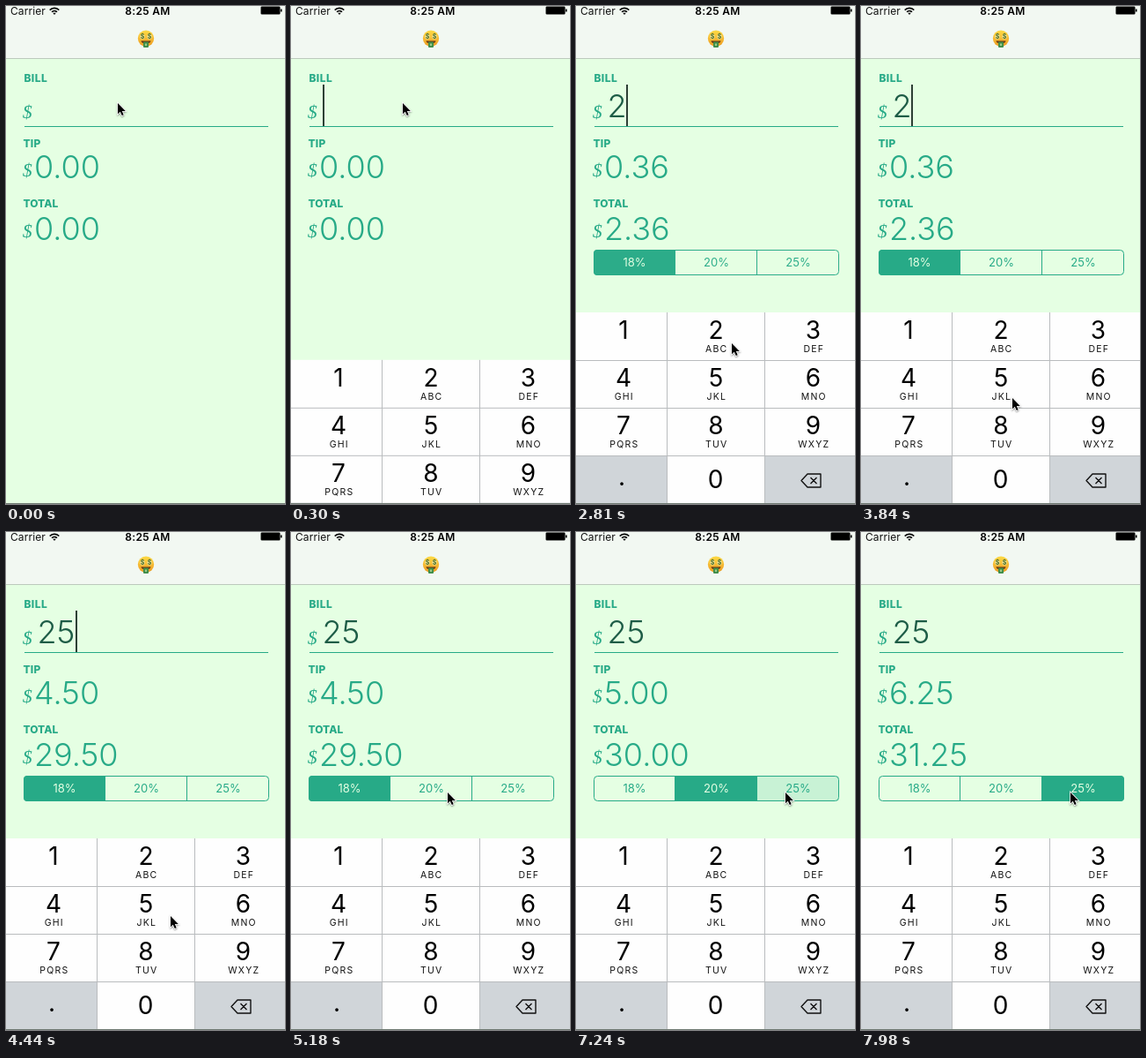
An HTML page with a canvas that plays this animation: 317x564 px, repeating every 8 s.

```html
<!DOCTYPE html>
<html lang="en">
<head>
<meta charset="utf-8">
<title>Tip calculator</title>
<style>
html, body { margin: 0; width: 100%; height: 100%; overflow: hidden; background: #e5ffe3; }
canvas { display: block; width: 317px; height: 564px; }
</style>
</head>
<body>
<canvas id="stage"></canvas>
<script>
const W = 317, H = 564, LOOP = 8000;
const TEAL = '#27aa87', MINT = '#e5ffe3', INK = '#1d5c46';
const SANS = 'Inter, Roboto, sans-serif';
const canvas = document.getElementById('stage');
const ctx = canvas.getContext('2d');
const ratio = window.devicePixelRatio || 1;
canvas.width = W * ratio;
canvas.height = H * ratio;

const clamp = v => Math.max(0, Math.min(1, v));
const ramp = (t, a, b) => clamp((t - a) / (b - a));
const smooth = p => p * p * (3 - 2 * p);

// Pointer stops: time, x, y
const POINTER = [
  [300, 126, 108], [590, 125, 246], [1490, 125, 246], [2070, 176, 380],
  [3200, 176, 380], [3400, 175, 414], [3780, 171, 442], [4140, 171, 442],
  [4290, 231, 462], [4440, 186, 433], [4640, 186, 433], [5130, 177, 293],
  [5820, 177, 293], [6300, 217, 293], [6500, 217, 293], [6940, 237, 293]
];

// Bill states: time, bill, tip, total, selected segment
const STATES = [
  [0, '', '0.00', '0.00', 0],
  [2500, '2', '0.36', '2.36', 0],
  [4120, '25', '4.50', '29.50', 0],
  [5450, '25', '5.00', '30.00', 1],
  [7350, '25', '6.25', '31.25', 2]
];

// Caret cycles: start, first fade out
const CARET = [[200, 870], [2500, 3050], [4120, 4660]];
const BLINK = 1030;

const KEYS = ['', 'ABC', 'DEF', 'GHI', 'JKL', 'MNO', 'PQRS', 'TUV', 'WXYZ'];
const COLS = [0, 104, 215, 317], MIDS = [54, 159, 269.5];

function rect(x, y, w, h, color) {
  ctx.fillStyle = color;
  ctx.fillRect(x, y, w, h);
}

function text(str, x, y, font, color, align = 'left', spacing = 0) {
  ctx.font = font;
  ctx.fillStyle = color;
  ctx.textAlign = align;
  ctx.letterSpacing = spacing + 'px';
  ctx.fillText(str, x, y);
}

function poly(points, fill) {
  ctx.beginPath();
  points.forEach(([x, y]) => ctx.lineTo(x, y));
  ctx.closePath();
  if (fill) { ctx.fillStyle = fill; ctx.fill(); }
}

function oval(x, y, rx, ry, fill) {
  ctx.beginPath();
  ctx.ellipse(x, y, rx, ry, 0, 0, Math.PI * 2);
  ctx.fillStyle = fill;
  ctx.fill();
}

function outline(x, y, w, h, r, color) {
  ctx.beginPath();
  ctx.roundRect(x, y, w, h, r);
  ctx.strokeStyle = color;
  ctx.lineWidth = 1;
  ctx.stroke();
}

function latest(list, t) {
  return list.reduce((found, item) => item[0] <= t ? item : found, list[0]);
}

function pointerAt(t) {
  const i = POINTER.findIndex(p => p[0] > t);
  if (i === 0) return POINTER[0].slice(1);
  if (i < 0) return POINTER[POINTER.length - 1].slice(1);
  const [a, x, y] = POINTER[i - 1], [b, u, v] = POINTER[i];
  const p = smooth(ramp(t, a, b));
  return [x + (u - x) * p, y + (v - y) * p];
}

function caretAlpha(t) {
  if (t < CARET[0][0]) return 0;
  const dt = t - latest(CARET, t)[1];
  if (dt < 0) return 1;
  const c = dt % BLINK;
  return c < 400 ? 1 - ramp(c, 0, 150) : ramp(c, 560, 670);
}

function drawFace(x, y) {
  const skin = ctx.createLinearGradient(0, y - 9, 0, y + 9);
  skin.addColorStop(0, '#fcd944');
  skin.addColorStop(1, '#ee9b22');
  oval(x, y - 0.3, 9.2, 9.2, skin);
  for (const side of [-4, 4]) {
    oval(x + side, y - 2.3, 2.6, 2.9, '#f3e9a0');
    text('$', x + side, y + 0.2, 'bold 7px ' + SANS, '#4a6b25', 'center');
  }
  ctx.beginPath();
  ctx.ellipse(x, y + 2.6, 5.5, 3.2, 0, 0, Math.PI);
  ctx.fillStyle = '#6b3a16';
  ctx.fill();
  ctx.beginPath();
  ctx.roundRect(x - 3, y + 3.5, 6, 6.5, 1);
  ctx.fillStyle = '#3f8d48';
  ctx.fill();
  oval(x, y + 6.8, 1.2, 1.5, '#9cc98c');
}

function drawHeader() {
  rect(0, 0, W, 59, '#f2f8f2');
  rect(0, 59, W, 1, '#bccabc');
  text('Carrier', 5, 10, '12px ' + SANS, '#111', 'left', 0.1);
  text('8:25 AM', 161, 10, '600 12px ' + SANS, '#000', 'center', 0.3);
  ctx.strokeStyle = '#000';
  ctx.lineWidth = 1.7;
  for (const r of [4, 7.2]) {
    ctx.beginPath();
    ctx.arc(55, 9.5, r, -Math.PI * 0.76, -Math.PI * 0.24);
    ctx.stroke();
  }
  poly([[55, 10], [53.2, 7.8], [56.8, 7.8]], '#000');
  outline(289.5, 0.5, 22, 9, 1.5, 'rgba(0,0,0,.5)');
  rect(290, 1, 21, 8, '#000');
  rect(312, 3.5, 1.5, 3, '#000');
  drawFace(159, 37);
}

function drawBill(t, [, bill, tip, total]) {
  const label = '800 12px ' + SANS, sign = 'italic 22px "Liberation Serif", serif';
  const money = '300 36px ' + SANS;
  text('BILL', 20.5, 86, label, TEAL, 'left', 0.4);
  text('TIP', 19.5, 160, label, TEAL, 'left', 0.2);
  text('TOTAL', 19.5, 228, label, TEAL);
  for (const y of [127, 193, 262]) text('$', 18.7, y, sign, TEAL);
  text(bill, 35.5, 126, money, INK);
  text(tip, 32, 195, money, TEAL);
  text(total, 32, 265, money, TEAL);
  rect(21, 136, 277, 1, TEAL);
  ctx.globalAlpha = caretAlpha(t);
  rect([36, 57, 79][bill.length], 89, 2, 47, '#2d3f35');
  ctx.globalAlpha = 1;
}

function drawSegments(t, selected) {
  const edges = [20, 112, 205, 299];
  const pressed = t > 5300 && t < 5450 ? 1 : t > 7200 && t < 7350 ? 2 : -1;
  ctx.globalAlpha = smooth(ramp(t, 2480, 2850));
  ctx.save();
  ctx.beginPath();
  ctx.roundRect(20, 276, 279, 29, 4);
  ctx.clip();
  ['18%', '20%', '25%'].forEach((name, i) => {
    const x = edges[i], w = edges[i + 1] - x, on = i === selected;
    if (on) rect(x, 276, w, 29, TEAL);
    if (i === pressed) rect(x, 276, w, 29, 'rgba(39,170,135,.15)');
    if (i) rect(x, 276, 1, 29, TEAL);
    text(name, [66.5, 159.5, 252.5][i], 295, '13px ' + SANS, on ? MINT : TEAL, 'center');
  });
  ctx.restore();
  outline(20.5, 276.5, 278, 28, 4, TEAL);
  ctx.globalAlpha = 1;
}

function drawKeypad(t) {
  const p = ramp(t, 130, 590);
  if (!p) return;
  ctx.save();
  ctx.translate(0, 347 + 217 * Math.pow(1 - p, 3));
  rect(0, 0, W, 217, '#fefefe');
  rect(0, 162, 104, 55, '#d0d5d9');
  rect(215, 162, 102, 55, '#d0d5d9');
  const pressed = t > 2350 && t < 2500 ? 1 : t > 3970 && t < 4120 ? 4 : -1;
  KEYS.forEach((letters, i) => {
    const c = i % 3, y = Math.floor(i / 3) * 54;
    if (i === pressed) rect(COLS[c], y, COLS[c + 1] - COLS[c], 54, '#d0d5d9');
    text(i + 1, MIDS[c], y + 30, '28px ' + SANS, '#000', 'center');
    text(letters, MIDS[c] + 0.8, y + 45, '10.5px ' + SANS, '#111', 'center', 1.2);
  });
  text('0', 158.5, 199, '28px ' + SANS, '#000', 'center');
  text('.', 52, 196, '28px ' + SANS, '#000', 'center');
  for (const y of [54, 108, 162]) rect(0, y, W, 1, '#b9bcbe');
  for (const x of [103, 214]) rect(x, 0, 1, 217, '#b9bcbe');
  ctx.strokeStyle = '#111';
  ctx.lineWidth = 1.4;
  ctx.lineJoin = 'round';
  poly([[256, 190.5], [263, 183], [278, 183], [278, 198], [263, 198]]);
  ctx.moveTo(266.5, 187); ctx.lineTo(273.5, 194);
  ctx.moveTo(273.5, 187); ctx.lineTo(266.5, 194);
  ctx.stroke();
  ctx.restore();
}

function drawPointer(t) {
  const [x, y] = pointerAt(t);
  ctx.save();
  ctx.translate(x + 1, y + 2);
  ctx.scale(0.88, 0.88);
  ctx.shadowColor = 'rgba(0,0,0,.35)';
  ctx.shadowBlur = 2 * ratio;
  ctx.shadowOffsetY = ratio;
  poly([[0, 0], [0, 14], [3.2, 11], [5.4, 16], [7.6, 15], [5.5, 10.2], [10, 10.2]], '#000');
  ctx.strokeStyle = '#fff';
  ctx.lineWidth = 1.8;
  ctx.lineJoin = 'miter';
  ctx.stroke();
  ctx.shadowColor = 'transparent';
  ctx.fill();
  ctx.restore();
}

function draw(now) {
  const t = now % LOOP, state = latest(STATES, t);
  ctx.setTransform(ratio, 0, 0, ratio, 0, 0);
  rect(0, 0, W, H, MINT);
  drawHeader();
  drawBill(t, state);
  drawSegments(t, state[4]);
  drawKeypad(t);
  rect(0, 563, W, 1, '#6f7a72');
  drawPointer(t);
}

const start = performance.now();
function tick() {
  draw(performance.now() - start);
  requestAnimationFrame(tick);
}
tick();
</script>
</body>
</html>
```
